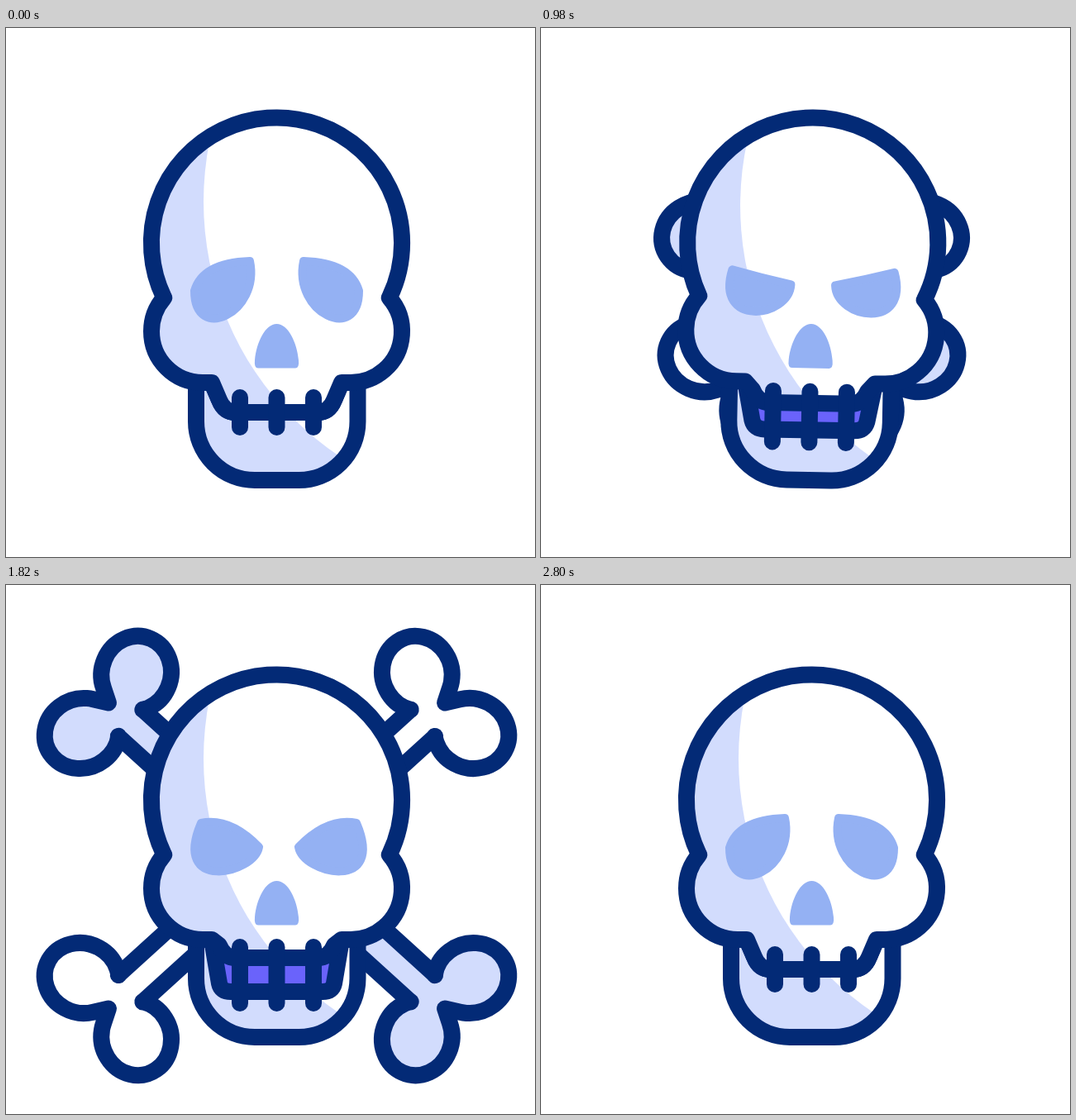
Recreate the animation shown at these times as an HTML page with a canvas. Size 640 by 640 pixels, loop 3600 ms.

```html
<!DOCTYPE html>
<html lang="en">
<head>
<meta charset="utf-8">
<title>Skull and crossbones</title>
<style>
  html, body { margin: 0; width: 100%; height: 100%; overflow: hidden; background: #fff; }
  canvas { display: block; width: 640px; height: 640px; }
</style>
</head>
<body>
<canvas id="stage" width="640" height="640"></canvas>
<script>
const ctx = document.getElementById('stage').getContext('2d');
const LOOP = 3600, CENTER = 327.5;
const INK = '#032a76', SHADE = '#d2dcfd', SOCKET = '#94b1f3', MOUTH = '#6a63fb';

const rad = deg => deg * Math.PI / 180;
const mix = (a, b, p) => a + (b - a) * p;
const mirror = x => 2 * CENTER - x;
const linear = (t, start, end) => Math.min(1, Math.max(0, (t - start) / (end - start)));
const ease = (t, start, end) => 0.5 - 0.5 * Math.cos(Math.PI * linear(t, start, end));

// Degrees: the head shakes, each swing adding to the last.
const tiltAt = t => 3.5 * ease(t, 120, 360) - 6.95 * ease(t, 360, 655)
  + 5.05 * ease(t, 655, 900) - 1.6 * ease(t, 900, 1100);

// 0 closed, 1 open.
const jawAt = t => ease(t, 322, 1265) - ease(t, 2300, 2790);

// 0 sad, 1 half shut, 2 angry.
const moodAt = t => ease(t, 320, 650) + ease(t, 650, 1260)
  - ease(t, 2300, 2550) - ease(t, 2550, 2790);

const reachAt = t => 40 + 235 * (ease(t, 800, 1180) - ease(t, 2520, 2780));

const swingAt = t => 46 + 8.8 * linear(t, 800, 1270) ** 2
  - 14.6 * ease(t, 1270, 2000) + 4.8 * ease(t, 2000, 2660);

// Left eye: outer corner, brow control, inner corner, two lower lid controls.
const SAD = [228, 318, 238, 284, 295, 282, 308, 345, 228, 382];
const SHUT = [224, 302, 261, 333, 297, 303, 300, 354, 224, 354];
const ANGRY = [236, 288, 271, 281, 306, 317, 300, 350, 200, 372];

const NOSE = new Path2D('M305 411.5Q300 411.5 301 402C303 380 314 358 327.5 358' +
  'C341 358 352 380 354 402Q355 411.5 350 411.5Z');
const JAW = new Path2D('M230 429V476A71 71 0 0 0 301 547H354A71 71 0 0 0 425.5 476V429');

function drawBoneEnd(direction, reach, fill) {
  const lobe = side => ctx.ellipse(reach - 1, side * 49, 45.5, 42, rad(side * 65),
    rad(side < 0 ? -151 : -129), rad(side < 0 ? 129 : 151));
  ctx.save();
  ctx.translate(CENTER, CENTER);
  ctx.rotate(rad(direction));
  ctx.beginPath();
  ctx.moveTo(0, -22);
  ctx.lineTo(reach - 36, -22);
  lobe(-1);
  ctx.lineTo(reach, 0);
  lobe(1);
  ctx.lineTo(reach - 36, 22);
  ctx.lineTo(0, 22);
  ctx.fillStyle = fill;
  ctx.fill();
  ctx.stroke();
  ctx.restore();
}

function drawBones(t) {
  if (t < 800 || t > 2780) return;
  const angle = swingAt(t), upper = reachAt(t), lower = reachAt(t - 7);
  drawBoneEnd(180 + angle, upper, SHADE);
  drawBoneEnd(angle, lower, SHADE);
  drawBoneEnd(-angle, upper, '#fff');
  drawBoneEnd(180 - angle, lower, '#fff');
}

// Adds a lip from the right mouth corner to the left one.
function addLip(path, sideY, y, bendX, endX) {
  path.lineTo(mirror(249), 429);
  path.lineTo(mirror(258), sideY);
  path.quadraticCurveTo(mirror(bendX), y, mirror(endX), y);
  path.lineTo(endX, y);
  path.quadraticCurveTo(bendX, y, 258, sideY);
  path.lineTo(249, 429);
  path.closePath();
}

function headPath(lipY) {
  const path = new Path2D();
  path.moveTo(249, 429);
  path.arc(238, 367, 62, rad(90), rad(221));
  path.arc(CENTER, 260, 151.6, rad(154.2), rad(385.8));
  path.arc(mirror(238), 367, 62, rad(-41), rad(90));
  addLip(path, lipY - 15, lipY, 264, 278);
  return path;
}

function mouthPath(open, lipY) {
  const path = new Path2D();
  path.moveTo(249, 429);
  addLip(path, mix(450, 482, open), lipY, mix(264, 260, open), mix(278, 272, open));
  return path;
}

function drawShaded(path) {
  ctx.save();
  ctx.fillStyle = SHADE;
  ctx.fill(path);
  ctx.clip(path);
  ctx.fillStyle = '#fff';
  ctx.beginPath();
  ctx.arc(610, 210, 371, 0, 2 * Math.PI);
  ctx.fill();
  ctx.restore();
  ctx.stroke(path);
}

function drawTeeth(open) {
  for (const x of [283, CENTER, 372]) {
    ctx.beginPath();
    ctx.moveTo(x, mix(447, 438, open));
    ctx.lineTo(x, mix(483, 506, open));
    ctx.stroke();
  }
}

function drawEyes(mood) {
  const [from, to] = mood < 1 ? [SAD, SHUT] : [SHUT, ANGRY];
  const anger = Math.max(0, mood - 1);
  const p = from.map((v, i) => mix(v, to[i], mood < 1 ? mood : anger));
  ctx.fillStyle = ctx.strokeStyle = SOCKET;
  ctx.lineWidth = 10;
  for (const place of [x => x, x => mirror(x) + 5 * anger]) {
    const [outer, brow, inner, lidIn, lidOut] = [0, 2, 4, 6, 8].map(i => [place(p[i]), p[i + 1]]);
    ctx.beginPath();
    ctx.moveTo(...outer);
    ctx.quadraticCurveTo(...brow, ...inner);
    ctx.bezierCurveTo(...lidIn, ...lidOut, ...outer);
    ctx.closePath();
    ctx.fill();
    ctx.stroke();
  }
}

function drawSkull(t) {
  const open = jawAt(t);
  const mouth = mouthPath(open, mix(465, 492, open));

  ctx.save();
  ctx.translate(CENTER, CENTER);
  ctx.rotate(rad(tiltAt(t)));
  ctx.translate(-CENTER, -CENTER);

  drawShaded(JAW);
  ctx.fillStyle = MOUTH;
  ctx.fill(mouth);
  ctx.stroke(mouth);
  drawShaded(headPath(mix(465, 451, open)));
  drawTeeth(open);

  ctx.fillStyle = SOCKET;
  ctx.fill(NOSE);
  drawEyes(moodAt(t));
  ctx.restore();
}

function render() {
  const t = performance.now() % LOOP;
  ctx.fillStyle = '#fff';
  ctx.fillRect(0, 0, 640, 640);
  ctx.strokeStyle = INK;
  ctx.lineWidth = 20;
  ctx.lineCap = ctx.lineJoin = 'round';
  drawBones(t);
  drawSkull(t);
  requestAnimationFrame(render);
}
render();
</script>
</body>
</html>
```
